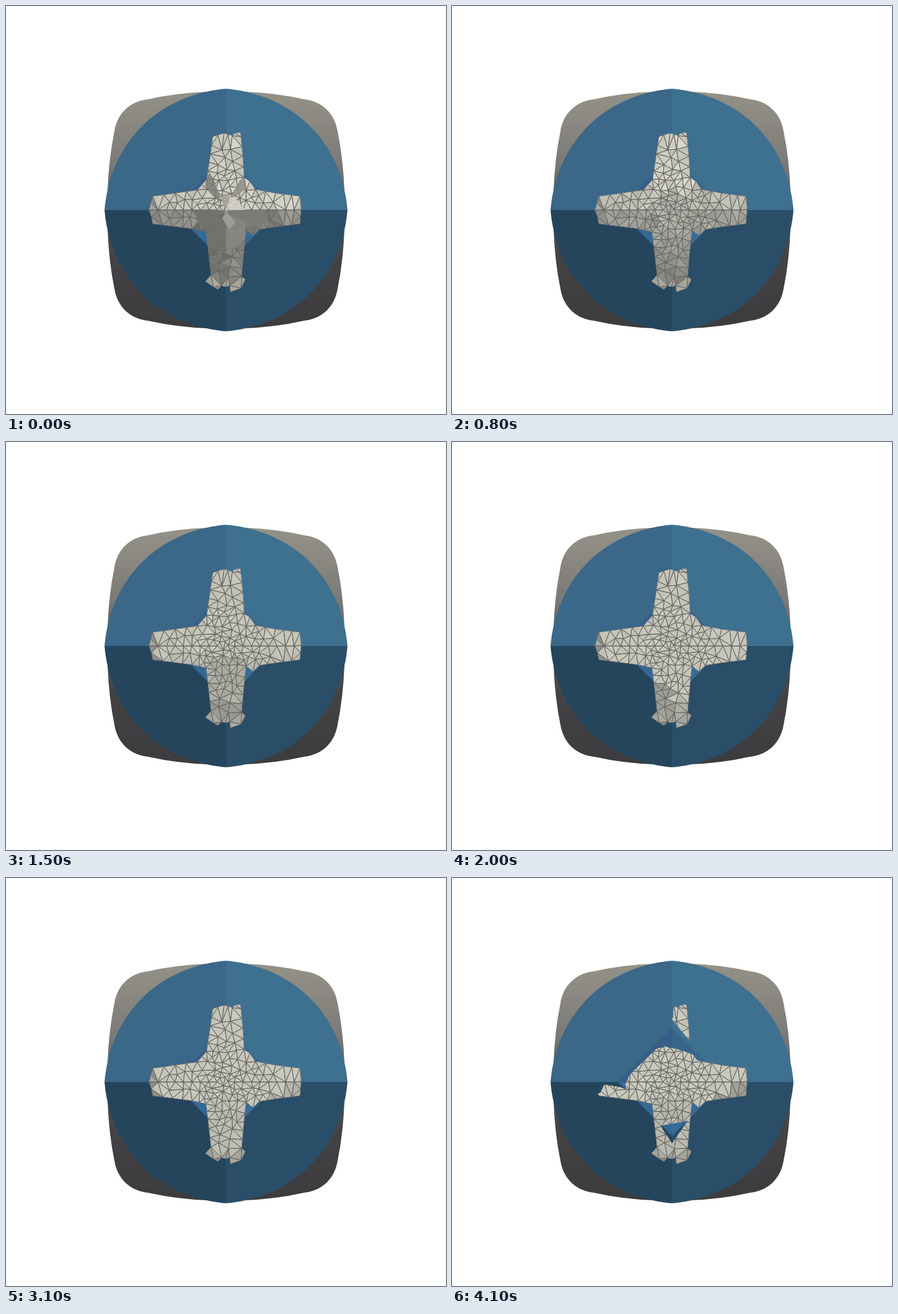
An HTML page with a canvas that plays this animation: 702 px wide and 652 px high, repeating every 4200 ms.

```html
<!DOCTYPE html>
<html lang="en">
<head>
<meta charset="utf-8">
<title>Cross mesh</title>
<style>
html, body { margin: 0; width: 100%; height: 100%; overflow: hidden; background: #fff; }
canvas { display: block; }
</style>
</head>
<body>
<canvas id="stage" width="702" height="652"></canvas>
<script>
const W = 702, H = 652, CX = 351, CY = 326, LOOP = 4200;
const ctx = document.getElementById('stage').getContext('2d');
const layer = document.createElement('canvas');
layer.width = W;
layer.height = H;
const mc = layer.getContext('2d');
const WIRE = 'rgb(104,103,99)';

// The picture advances every 100 ms inside these spans and rests between them.
const spans = [[300, 800], [900, 1400], [1500, 1700], [2000, 2300],
  [2500, 3000], [3100, 3200], [3400, 3600], [3800, 4100]];
const ticks = [];
for (const [a, b] of spans) for (let t = a; t <= b; t += 100) ticks.push(t);

let seed = 71;
function rnd() {
  seed = (seed * 1664525 + 1013904223) % 4294967296;
  return seed / 4294967296;
}
const clamp = v => Math.max(0, Math.min(1, v));
const mix = (a, b, u) => a + (b - a) * u;
const pairs = s => s.split(' ').map(p => p.split(',').map(Number));

function trace(c, pts) {
  c.beginPath();
  pts.forEach(([x, y], i) => i ? c.lineTo(x, y) : c.moveTo(x, y));
  c.closePath();
}

function gray(v) {
  return `rgb(${v | 0},${v - 1 | 0},${v - 3 - Math.max(0, v - 100) * 0.09 | 0})`;
}

/* ---------- body ---------- */

function drawBody() {
  const g = ctx.createLinearGradient(0, 137, 0, 515);
  g.addColorStop(0, '#949287');
  g.addColorStop(0.12, '#8b8981');
  g.addColorStop(0.3, '#7b7a75');
  g.addColorStop(0.5, '#565656');
  g.addColorStop(0.7, '#434345');
  g.addColorStop(1, '#3c3c3e');
  ctx.fillStyle = g;
  for (const sx of [-1, 1]) for (const sy of [-1, 1]) {
    const p = (...a) => a.map((v, i) => i % 2 ? CY + sy * v : CX + sx * v);
    ctx.beginPath();
    ctx.moveTo(...p(0, 0));
    ctx.lineTo(...p(189, 30));
    ctx.quadraticCurveTo(...p(187, 82, 178, 126));
    ctx.bezierCurveTo(...p(173, 156, 152, 174, 124, 177));
    ctx.quadraticCurveTo(...p(80, 187, 30, 189));
    ctx.fill();
  }
}

function quadrants(pts, tl, tr, bl, br) {
  ctx.save();
  trace(ctx, pts);
  ctx.clip();
  [tl, tr, bl, br].forEach((color, i) => {
    ctx.fillStyle = color;
    ctx.fillRect(i % 2 ? CX : 0, i < 2 ? 0 : CY, CX, CY);
  });
  ctx.restore();
}

const disc = [];
for (let d = 0; d < 360; d++) {
  const fold = Math.min(d % 90, 90 - d % 90) / 45;
  const r = 189.5 + 4.3 * (1 - fold) ** 3;
  const a = d * Math.PI / 180;
  disc.push([CX + r * Math.cos(a), CY + r * Math.sin(a)]);
}
const diamond = [[CX, CY - 86], [CX + 86, CY], [CX, CY + 86], [CX - 86, CY]];

/* ---------- mesh ---------- */

const outline = pairs('330,209 338,206 348,203 354,205 361,207 365,203 374,202 375,209 ' +
  '378,240 380,274 389,280 398,293 430,299 469,304 471,325 469,348 430,353 404,357 ' +
  '394,367 383,358 381,376 376,432 382,437 375,451 358,457 357,447 350,449 344,447 ' +
  '338,453 331,449 318,440 327,430 322,385 319,361 297,356 234,348 232,337 228,326 ' +
  '234,304 270,299 305,294 320,277 324,250');

function inside(x, y) {
  let hit = false;
  outline.forEach(([ax, ay], i) => {
    const [bx, by] = outline[(i + 1) % outline.length];
    if ((ay > y) !== (by > y) && x < ax + (bx - ax) * (y - ay) / (by - ay)) hit = !hit;
  });
  return hit;
}

function scatter() {
  const pts = [];
  const put = (x, y) => pts.push([x + rnd() * 0.02, y + rnd() * 0.02]);
  outline.forEach(([ax, ay], i) => {
    const [bx, by] = outline[(i + 1) % outline.length];
    const n = Math.max(1, Math.round(Math.hypot(bx - ax, by - ay) / 15));
    for (let k = 0; k < n; k++) put(mix(ax, bx, k / n), mix(ay, by, k / n));
  });
  for (let k = 0; k < 8; k++) {
    put(CX + 14 + k * 13.5, CY);
    put(CX - 14 - k * 13.5, CY);
  }
  for (let k = 0; k < 5000; k++) {
    const x = 230 + rnd() * 240, y = 204 + rnd() * 250;
    if (!inside(x, y)) continue;
    const r = Math.hypot(x - CX, y - CY);
    const gap = Math.min(13, 7.5 + Math.max(0, r - 25) * 0.08);
    if (pts.every(p => Math.hypot(p[0] - x, p[1] - y) > gap)) put(x, y);
  }
  return pts;
}

function circle(a, b, c) {
  const bx = b[0] - a[0], by = b[1] - a[1], cx = c[0] - a[0], cy = c[1] - a[1];
  const d = 2 * (bx * cy - by * cx) || 1e-9;
  const p = bx * bx + by * by, q = cx * cx + cy * cy;
  const x = (cy * p - by * q) / d, y = (bx * q - cx * p) / d;
  return { pts: [a, b, c], x: a[0] + x, y: a[1] + y, r2: x * x + y * y };
}

function triangulate(pts) {
  let tris = [circle([-3000, -2000], [4000, -2000], [350, 5000])];
  for (const p of pts) {
    const edges = [];
    tris = tris.filter(t => {
      if ((p[0] - t.x) ** 2 + (p[1] - t.y) ** 2 >= t.r2) return true;
      for (let i = 0; i < 3; i++) {
        const a = t.pts[i], b = t.pts[(i + 1) % 3];
        const k = edges.findIndex(e => e[0] === b && e[1] === a);
        if (k < 0) edges.push([a, b]);
        else edges.splice(k, 1);
      }
      return false;
    });
    for (const [a, b] of edges) tris.push(circle(a, b, p));
  }
  return tris;
}

const mesh = triangulate(scatter()).map(t => ({
  pts: t.pts,
  x: (t.pts[0][0] + t.pts[1][0] + t.pts[2][0]) / 3,
  y: (t.pts[0][1] + t.pts[1][1] + t.pts[2][1]) / 3,
  noise: rnd() * 2 - 1
})).filter(t => inside(t.x, t.y));

/* ---------- light ---------- */

// Each look: step, jitter, brightness at an offset from the centre.
const isTall = (x, y) => Math.abs(y) > Math.abs(x);
const patch = (x, y) => x > 60 && y > 2 && y > 24 - (x - 60) * 0.4;
const looks = [
  [0, 11, (x, y) => {
    if (isTall(x, y)) return y < 0 ? 204 : (x < 0 ? 119 : 133) + Math.max(0, y - 60) * 0.15;
    if (y < 0) return x < 0 ? 198 : 205;
    return x < 0 ? (x > -48 ? 116 : 144) : x > 88 ? 152 : 128;
  }],
  [6, 12, (x, y) => {
    if (Math.abs(x) + Math.abs(y) < 38) return 178;
    if (isTall(x, y)) return y < 0 ? 207 : 172 - (y - 24) * 0.42;
    if (y < 0) return x < 0 ? 192 : 188;
    return x < 0 ? 158 : 164;
  }],
  [13, 6, (x, y) => isTall(x, y) && y > 16 ? (y > 88 ? 156 : 175) : y > 16 ? 188 : 197],
  [16, 5, (x, y) => y > 62 && x < 0 ? 160 : y > 84 ? 176 : 199],
  [22, 4, (x, y) => isTall(x, y) && y > 20 && y < 55 ? 189 : 200],
  [30, 4, (x, y) => patch(x, y) ? 160 : y > 52 ? 181 : 200],
  [34, 4, (x, y) => patch(x, y) ? 160 : y > 24 && isTall(x, y) ? 187 : 200]
];

function shade(t, step) {
  let i = 0;
  while (i < looks.length - 2 && step > looks[i + 1][0]) i++;
  const [a, b] = [looks[i], looks[i + 1]];
  const u = (step - a[0]) / (b[0] - a[0]);
  const x = t.x - CX, y = t.y - CY;
  if (y > 113) return 150 + 28 * t.noise;
  if (x < -112 && step < 28) return 150 + 20 * t.noise;
  return mix(a[2](x, y), b[2](x, y), u) + t.noise * mix(a[1], b[1], u);
}

// Folds of the opening pose: points and brightness.
const folds = [
  ['320,266 318,288 340,313 341,302 330,274', 126],
  ['380,274 373,278 357,308 365,306 382,292', 146],
  ['341,305 351,326 358,304 351,300', 165],
  ['364,305 382,326 351,328 357,306', 212],
  ['351,326 412,326 420,346 383,355 372,340', 125],
  ['351,326 300,326 306,350 320,357', 116],
  ['351,329 320,357 322,385 351,395', 114],
  ['351,329 383,346 380,372 362,388 351,388', 136],
  ['351,329 345,340 357,357 366,345', 164]
].map(([p, v]) => [pairs(p), v]);

/* ---------- openings ---------- */

// Each opening: first step, full step, where it starts, its border.
const holes = [
  [27, 30, 356, 266, '351,226 378,259 388,262 400,293 391,291 384,282 362,274 343,270 331,263 325,265'],
  [27, 30, 262, 327, '263,328 270,319 271,327'],
  [27, 30, 226, 325, '222,322 232,324 244,321 238,331 234,337 222,334'],
  [30, 34, 337, 236, '351,226 353,222 353,196 322,196 314,280 327,272 340,270 331,262'],
  [30, 34, 252, 315, '222,290 302,290 314,276 327,264 332,271 327,272 300,298 283,315 276,331 279,338 268,334 243,330 236,344 222,340'],
  [30, 34, 352, 400, '333,396 376,388 351,424']
].map(h => [...h.slice(0, 4), pairs(h[4])]);

function drawCross(step) {
  mc.clearRect(0, 0, W, H);
  mc.save();
  trace(mc, outline);
  mc.fillStyle = gray(170);
  mc.fill();
  mc.clip();
  mc.lineWidth = 1;
  mc.lineJoin = 'round';
  mc.strokeStyle = WIRE;
  for (const t of mesh) {
    trace(mc, t.pts);
    mc.fillStyle = gray(shade(t, step));
    mc.fill();
  }
  mc.beginPath();
  for (const t of mesh) {
    const [a, b, c] = t.pts;
    mc.moveTo(...a);
    mc.lineTo(...b);
    mc.lineTo(...c);
    mc.closePath();
  }
  mc.stroke();

  mc.globalAlpha = clamp(1 - step / 6) * 0.85;
  if (mc.globalAlpha > 0) for (const [pts, v] of folds) {
    trace(mc, pts);
    mc.fillStyle = gray(v);
    mc.fill();
  }
  mc.restore();

  mc.globalCompositeOperation = 'destination-out';
  for (const [from, to, ox, oy, pts] of holes) {
    const u = clamp((step - from) / (to - from));
    if (!u) continue;
    trace(mc, pts.map(([x, y]) => [mix(ox, x, u), mix(oy, y, u)]));
    mc.fill();
  }
  mc.globalCompositeOperation = 'source-over';
}

function draw(step) {
  ctx.fillStyle = '#fff';
  ctx.fillRect(0, 0, W, H);
  drawBody();
  quadrants(disc, '#3b6788', '#3e7090', '#25455d', '#2a4e67');
  quadrants(diamond, '#355f88', '#39658d', '#346895', '#376c99');
  drawCross(step);
  ctx.drawImage(layer, 0, 0);
}

let shown = -1;
function frame() {
  const t = performance.now() % LOOP;
  const step = ticks.filter(k => k <= t).length;
  if (step !== shown) draw(shown = step);
  requestAnimationFrame(frame);
}
frame();
</script>
</body>
</html>
```
